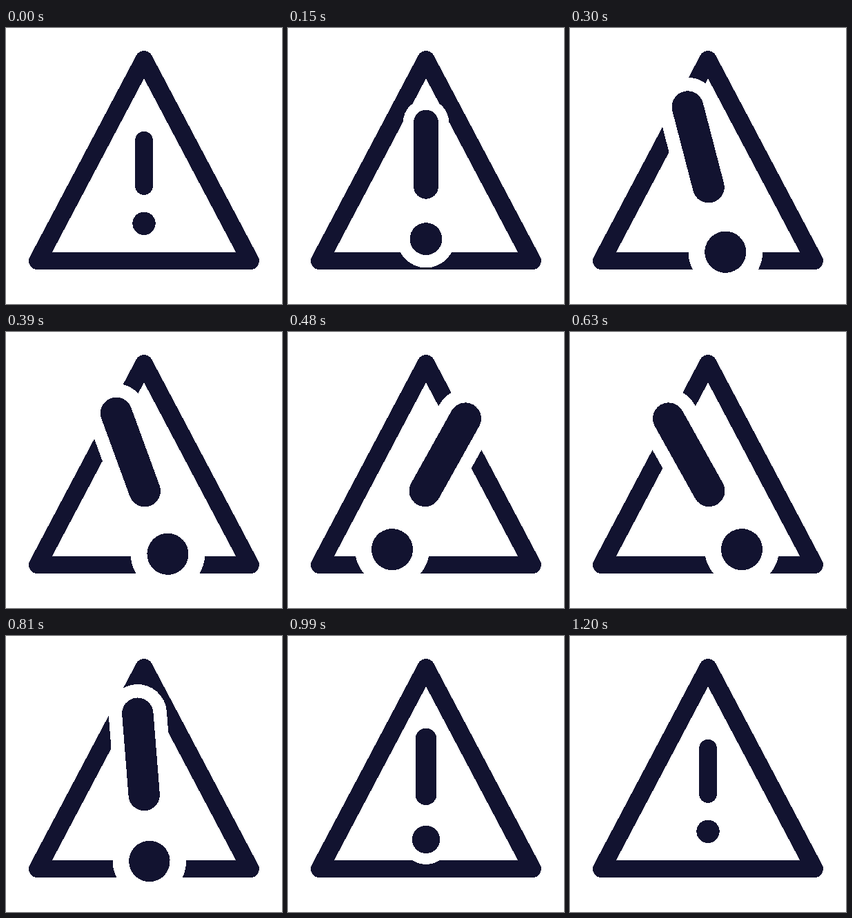
Animation, 400 px wide and 400 px high, one loop 3.23 s. Source, as an HTML page:

```html
<!DOCTYPE html>
<html lang="en">
<head>
<meta charset="utf-8">
<title>Warning sign</title>
<style>
  html, body { margin: 0; width: 100%; height: 100%; overflow: hidden; background: #fff; }
  svg { display: block; width: 100%; height: 100%; shape-rendering: crispEdges; }
  .line { fill: none; stroke: #121330; stroke-width: 25.5; stroke-linecap: round; stroke-linejoin: round; }
  .gap { fill: #fff; stroke: #fff; stroke-width: 47.4; stroke-linecap: round; }
  .dot { fill: #121330; }
</style>
</head>
<body>
<svg viewBox="0 0 400 400">
  <path class="line" d="M200 45.83 L354.17 337.5 H45.83 Z"/>
  <g id="mark">
    <path class="gap" d="M200 162.5 V229.2"/>
    <circle cx="200" cy="283.3" r="29.9" fill="#fff"/>
    <path class="line" d="M200 162.5 V229.2"/>
    <circle class="dot" cx="200" cy="283.3" r="16.7"/>
  </g>
</svg>
<script>
  const LOOP = 3230, STEP = 30, LAST = 40;
  const PIVOT = { x: 200, y: 227.5 };

  // [step, value] pairs, eased in and out between neighbours
  const SCALE = [[0, 1], [10, 1.8], [26, 1.8], [36.5, 1]];
  const ANGLE = [[8, 0], [12, -29.2], [16, 29.2], [21, -29.2], [29, 0]];

  const ease = x => x * x * (3 - 2 * x);

  function valueAt(keys, k) {
    if (k <= keys[0][0]) return keys[0][1];
    for (let i = 1; i < keys.length; i++) {
      const [k0, v0] = keys[i - 1], [k1, v1] = keys[i];
      if (k <= k1) return v0 + (v1 - v0) * ease((k - k0) / (k1 - k0));
    }
    return keys[keys.length - 1][1];
  }

  const mark = document.getElementById('mark');
  const start = performance.now();

  function draw() {
    const t = (performance.now() - start) % LOOP;
    const k = Math.min(LAST, Math.floor(t / STEP));
    const { x, y } = PIVOT;
    mark.setAttribute('transform',
      `translate(${x} ${y}) rotate(${valueAt(ANGLE, k)}) scale(${valueAt(SCALE, k)}) translate(${-x} ${-y})`);
    requestAnimationFrame(draw);
  }
  draw();
</script>
</body>
</html>
```
